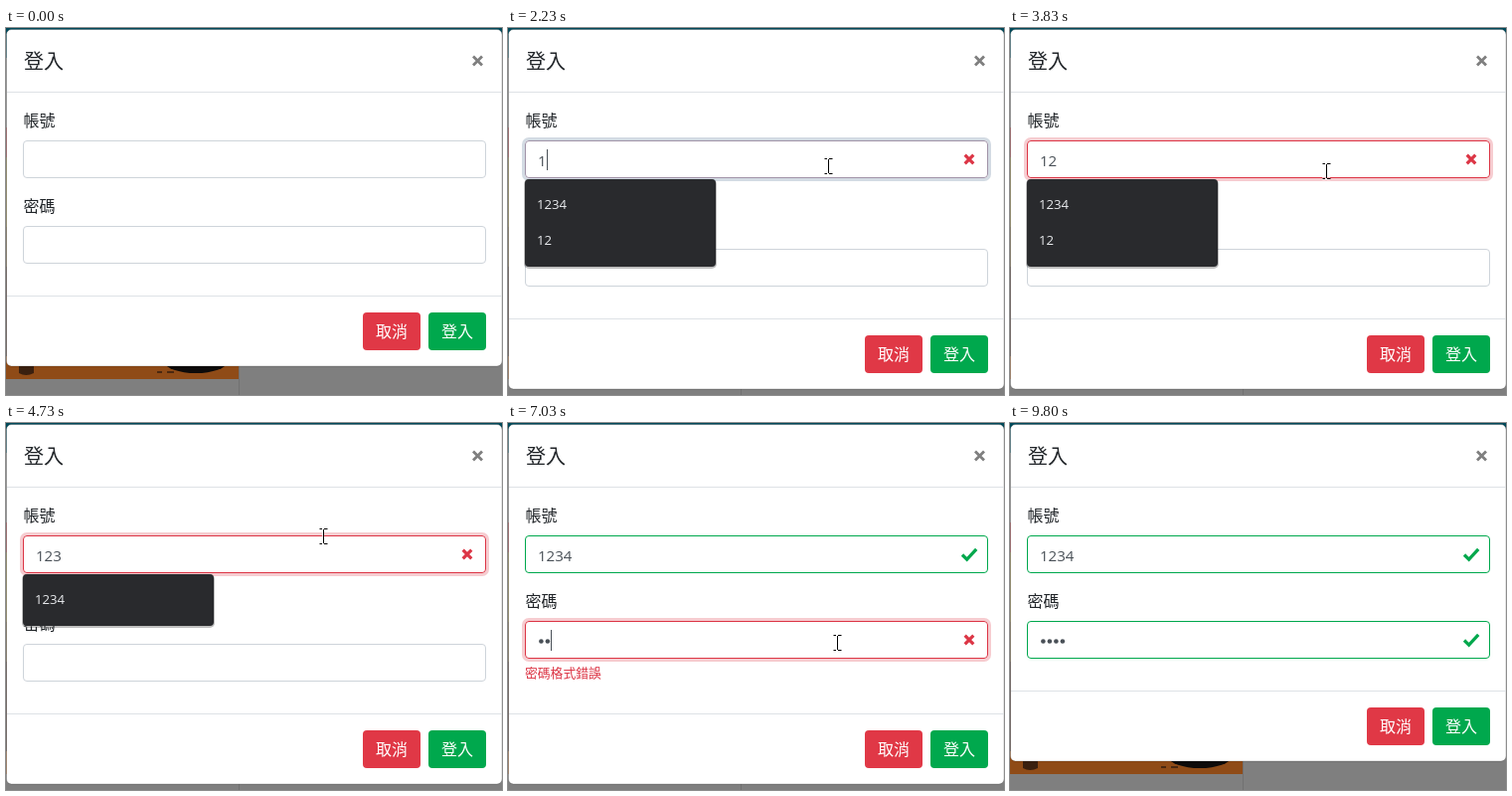
These frames come from a looping animation (499 by 369 pixels, 9.83 s). An HTML page:

```html
<!DOCTYPE html>
<html lang="zh-Hant">
<head>
<meta charset="utf-8">
<title>登入</title>
<style>
html, body { margin: 0; width: 100%; height: 100%; overflow: hidden; background: #7f7f7f; }
svg { display: block; width: 499px; height: 369px; }
text { font-family: "Noto Sans CJK TC", "Noto Sans CJK JP", "Noto Sans CJK SC", "Noto Sans CJK", sans-serif; font-size: 16px; font-weight: 300; fill: #212529; }
.num { font-family: "Open Sans", "Noto Sans", sans-serif; font-size: 15.08px; font-weight: 400; fill: #495057; }
.item { font-family: "Open Sans", "Noto Sans", sans-serif; font-size: 13.2px; font-weight: 400; fill: #e8eaed; }
.err { font-size: 12.8px; fill: #dc3545; }
.btn { fill: #fff; font-weight: 400; }
.icon { fill: none; stroke-width: 3.2; }
</style>
</head>
<body>
<svg viewBox="0 0 499 369">
  <rect width="499" height="369" fill="#7f7f7f"/>
  <rect width="499" height="30" fill="#00495a"/>
  <rect y="100" width="2" height="30" fill="#8a1c20"/>
  <rect y="130" width="2" height="70" fill="#75641f"/>
  <rect y="200" width="2" height="40" fill="#55401c"/>
  <rect y="240" width="2" height="90" fill="#2b150c"/>
  <rect y="330" width="234" height="23" fill="#8f4b17"/>
  <path d="M13 336H28V347Q20 351 13 347Z" fill="#3a200f"/>
  <ellipse cx="191" cy="336" rx="31" ry="11" fill="#0d0b0a"/>
  <path d="M152 346h5M162 346h7" stroke="#4a2810" stroke-width="2"/>
  <rect x="234" y="330" width="1" height="39" fill="#717171"/>

  <rect id="modal" x=".5" y="1.5" width="498.5" rx="5" fill="#fff" stroke="#000" stroke-opacity=".2"/>
  <text x="18" y="40.5" style="font-size:20px">登入</text>
  <path d="M470 28.5L479 37.5M479 28.5L470 37.5" stroke="#7f7f7f" stroke-width="2.8"/>
  <rect x="1" y="64" width="498" height="1" fill="#dee2e6"/>

  <text x="17.5" y="99">帳號</text>
  <g id="user"></g>
  <text id="userErr" class="err" x="17" y="170.5">帳號格式錯誤</text>

  <g id="lower">
    <text x="17.5" y="185">密碼</text>
    <g id="pass"></g>
  </g>
  <text id="passErr" class="err" x="17" y="256">密碼格式錯誤</text>

  <g id="footer">
    <rect x="1" y="269" width="498" height="1" fill="#dee2e6"/>
    <rect x="359" y="286" width="58" height="38" rx="4" fill="#e03846"/>
    <text class="btn" x="372" y="311">取消</text>
    <rect x="425" y="286" width="58" height="38" rx="4" fill="#00a84d"/>
    <text class="btn" x="438" y="311">登入</text>
  </g>

  <g id="menu">
    <rect id="menuShade" x="16" y="152" width="194" rx="5" fill="#000" opacity=".25"/>
    <rect id="menuBox" x="17" y="152" width="192" rx="4" fill="#292a2d"/>
    <text class="item" x="29" y="182">1234</text>
    <text class="item" id="item2" x="29" y="218">12</text>
  </g>

  <path id="arrow" d="M.5 .5V16.5L4.2 13L6.9 18.8L9.4 17.7L6.8 12H11.8Z" fill="#fff" stroke="#000"/>
  <g id="beam" fill="none">
    <path d="M-4 -7.5H4M-4 7.5H4M0 -8V8" stroke="#fff" stroke-width="2.4" opacity=".7"/>
    <path d="M-3.5 -7.5H-1M1 -7.5H4.5M.5 -7V7M-3.5 7.5H-1M1 7.5H4.5" stroke="#000"/>
  </g>
</svg>
<script>
const LOOP = 9830, BLINK = 530, FADE = 150, GROW = 23;
const $ = id => document.getElementById(id);
const set = (el, attrs) => { for (const k in attrs) el.setAttribute(k, attrs[k]); };
const show = (el, on) => el.setAttribute("visibility", on ? "inherit" : "hidden");
const within = (t, a, b) => t >= a && t < b;
const smooth = p => p * p * (3 - 2 * p);
const clamp = p => Math.max(0, Math.min(1, p));

// border colour and ring colour with alpha
const plain = [206, 212, 218, 0, 147, 184, 0];
const blue = [128, 200, 224, 0, 147, 184, .25];
const red = [220, 53, 69, 220, 53, 69, .25];
const green = [0, 168, 77, 0, 168, 77, .25];
const blur = c => [...c.slice(0, 6), 0];

const userLooks = [[0, plain], [1370, blue], [2170, red], [3000, blur(red)],
  [3180, red], [4870, green], [5800, blur(green)]];
const passLooks = [[0, plain], [5800, blue], [6330, red], [8380, green], [9670, blur(green)]];

// keystroke times and moments that restart the caret
const userKeys = [2170, 2470, 4200, 4870];
const passKeys = [6335, 7030, 7730, 8395];
const userResets = [1370, 3180, ...userKeys].sort((a, b) => a - b);
const passResets = [5800, ...passKeys];

const mouse = [[600, 494, 364], [820, 420, 262], [1060, 322, 121], [1230, 322, 139],
  [2500, 322, 139], [2830, 322, 89], [3010, 322, 89], [3200, 317, 132],
  [3640, 317, 132], [3900, 318, 146], [4380, 318, 146], [4530, 319, 114],
  [4960, 319, 114], [5390, 331, 221], [9080, 331, 221], [9230, 254, 371]];

function makeField(id, y) {
  const g = $(id);
  g.innerHTML = `
    <rect class="ring" x="15.5" y="${y - 1.5}" width="469" height="41" rx="5.5" fill="none" stroke-width="3"/>
    <rect class="box" x="17.5" y="${y + .5}" width="465" height="37" rx="3.5" fill="#fff"/>
    <path class="icon bad" d="M459.7 ${y + 14.7}l8.6 8.6m0 -8.6l-8.6 8.6" stroke="#dc3545"/>
    <path class="icon good" d="M457 ${y + 19.5}l4.7 4.7l9.5 -10.4" stroke="#00a84d"/>
    <g class="value"></g>
    <rect class="caret" y="${y + 9}" width="1" height="21" fill="#495057"/>`;
  const part = {};
  for (const n of ["ring", "box", "bad", "good", "value", "caret"]) part[n] = g.querySelector("." + n);
  return part;
}

const user = makeField("user", 113), pass = makeField("pass", 199);
user.value.innerHTML = '<text class="num" x="30" y="139"></text>';
const userText = user.value.firstChild;
pass.value.innerHTML = [0, 1, 2, 3].map(i =>
  `<circle cx="${33.4 + i * 6.5}" cy="219.5" r="2.3" fill="#495057"/>`).join("");
const dots = [...pass.value.children];

function lookAt(looks, t) {
  let i = looks.length - 1;
  while (looks[i][0] > t) i--;
  const to = looks[i][1], from = i ? looks[i - 1][1] : to;
  const p = smooth(clamp((t - looks[i][0]) / FADE));
  return to.map((v, k) => from[k] + (v - from[k]) * p);
}

function paintField(f, looks, t, typed, focused, resets, caretX) {
  const c = lookAt(looks, t);
  set(f.box, { stroke: `rgb(${c.slice(0, 3).map(Math.round)})` });
  set(f.ring, { stroke: `rgb(${c.slice(3, 6).map(Math.round)})`, "stroke-opacity": c[6] });
  show(f.bad, typed > 0 && typed < 4);
  show(f.good, typed > 3);
  const last = resets.filter(r => r <= t).pop() || 0;
  show(f.caret, focused && Math.floor((t - last) / BLINK) % 2 === 0);
  set(f.caret, { x: Math.round(caretX) });
}

function paintMouse(t, low) {
  let i = mouse.findIndex(m => m[0] > t);
  const on = i > 0;
  let x = 0, y = 0;
  if (on) {
    const [t0, x0, y0] = mouse[i - 1], [t1, x1, y1] = mouse[i];
    const p = smooth((t - t0) / (t1 - t0));
    x = Math.round(x0 + (x1 - x0) * p);
    y = Math.round(y0 + (y1 - y0) * p);
  }
  const overField = within(x, 17, 483) && (within(y, 113, 151) || within(y, 199 + low, 237 + low));
  show($("arrow"), on && !overField);
  show($("beam"), on && overField);
  for (const id of ["arrow", "beam"]) set($(id), { transform: `translate(${x} ${y})` });
}

function draw(t) {
  const n = userKeys.filter(k => k <= t).length;
  const m = passKeys.filter(k => k <= t).length;
  const userBad = n > 0 && n < 4, passBad = m > 0 && m < 4;
  const low = userBad ? GROW : 0, grown = userBad || passBad ? GROW : 0;

  set($("modal"), { height: 338.5 + grown });
  set($("lower"), { transform: `translate(0 ${low})` });
  set($("footer"), { transform: `translate(0 ${grown})` });
  show($("userErr"), userBad);
  show($("passErr"), passBad);

  userText.textContent = "1234".slice(0, n);
  dots.forEach((d, i) => show(d, i < m));
  const userOn = within(t, 1370, 3000) || within(t, 3180, 5800);
  paintField(user, userLooks, t, n, userOn, userResets, 30 + n * 8.63);
  paintField(pass, passLooks, t, m, within(t, 5800, 9730), passResets, 30.3 + m * 6.45);

  const tall = n < 3, h = tall ? 88 : 52;
  show($("menu"), within(t, 1370, 3000) || within(t, 3770, 4870));
  show($("item2"), tall);
  set($("menuBox"), { height: h });
  set($("menuShade"), { height: h + 2 });
  paintMouse(t, low);
}

const start = performance.now();
function tick() {
  draw((performance.now() - start) % LOOP);
  requestAnimationFrame(tick);
}
tick();
</script>
</body>
</html>
```
